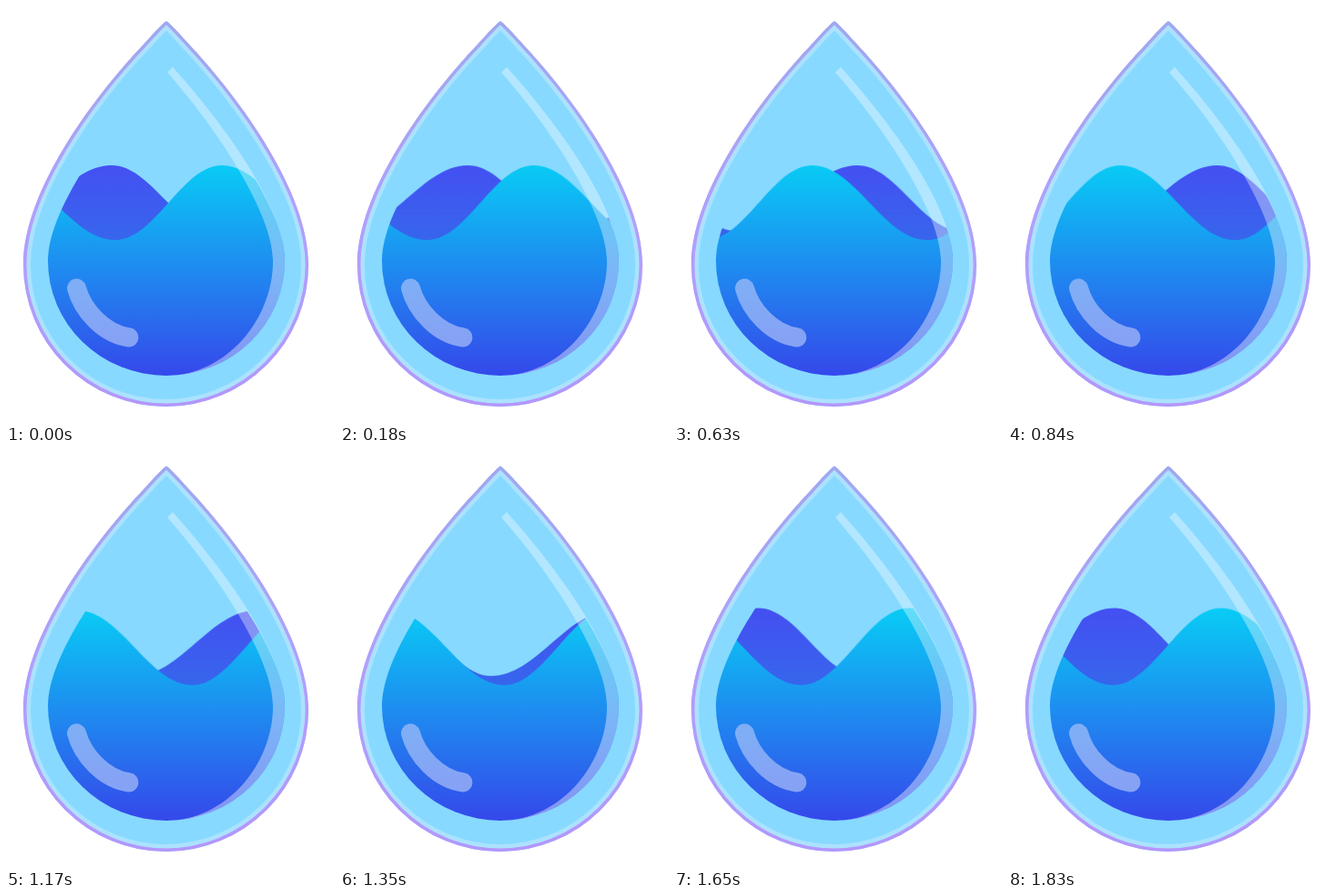
These frames come from a looping animation (360x458 px, 1.86 s). An HTML page:

```html
<!DOCTYPE html>
<html lang="en">
<head>
<meta charset="utf-8">
<title>Water drop</title>
<style>
  html, body { margin: 0; width: 100%; height: 100%; overflow: hidden; background: #fff; }
  svg { display: block; width: 360px; height: 458px; }
  .wave { animation: drift 1860ms steps(62) infinite; }
  #front { --run: -252px; }
  #back { --run: 252px; }
  @keyframes drift { to { transform: translateX(var(--run)); } }
</style>
</head>
<body>
<svg viewBox="0 0 360 458">
  <defs>
    <path id="shell" d="M176 16.5C181 20 190 30 200 41C258 103 332 205 332 284A156.5 156 0 0 1 19 284C19 205 93 103 152 41C162 30 171 20 176 16.5Z"/>
    <clipPath id="shellClip"><use href="#shell"/></clipPath>
    <clipPath id="tankClip">
      <path d="M176 62L180 66C245 140 306 225 306 280A130 126 0 0 1 46 280C46 225 107 140 172 66Z"/>
    </clipPath>
    <linearGradient id="rim" x2="0" y2="1">
      <stop offset="0" stop-color="#a3a6ee"/>
      <stop offset=".5" stop-color="#b49efc"/>
      <stop offset="1" stop-color="#b496fb"/>
    </linearGradient>
    <linearGradient id="water" gradientUnits="userSpaceOnUse" x1="0" y1="175" x2="0" y2="405">
      <stop offset="0" stop-color="#09cbf5"/>
      <stop offset="1" stop-color="#3549eb"/>
    </linearGradient>
    <linearGradient id="deep" gradientUnits="userSpaceOnUse" x1="0" y1="175" x2="0" y2="257">
      <stop offset="0" stop-color="#4450f2"/>
      <stop offset="1" stop-color="#3766ec"/>
    </linearGradient>
    <linearGradient id="shine" gradientUnits="userSpaceOnUse" x1="0" y1="67" x2="0" y2="405">
      <stop offset="0" stop-color="#fff" stop-opacity=".36"/>
      <stop offset=".5" stop-color="#fff" stop-opacity=".36"/>
      <stop offset=".65" stop-color="#d8e4fe" stop-opacity=".5"/>
      <stop offset="1" stop-color="#d0d6fd" stop-opacity=".52"/>
    </linearGradient>
    <linearGradient id="glint" x2="0" y2="1">
      <stop offset="0" stop-color="#7faef6"/>
      <stop offset="1" stop-color="#86a2f5"/>
    </linearGradient>
  </defs>

  <g clip-path="url(#shellClip)">
    <use href="#shell" fill="#87d9ff"/>
    <use href="#shell" fill="none" stroke="#abe2fe" stroke-width="16"/>
    <use href="#shell" fill="none" stroke="url(#rim)" stroke-width="7"/>
  </g>

  <g clip-path="url(#tankClip)">
    <path id="back" class="wave" fill="url(#deep)"/>
    <path id="front" class="wave" fill="url(#water)"/>
  </g>

  <path fill="url(#shine)" d="M183 67C248 140 306 225 306 280A130 126 0 0 1 176 406C241 406 293 345 293 280C293 230 236 140 177 73Z"/>
  <path fill="none" stroke="url(#glint)" stroke-width="21" stroke-linecap="round" d="M77.500 310C84 334 107 360 135 364"/>
</svg>
<script>
  // Joins crests and troughs with near-cosine arcs, then closes below the tank.
  function wave(id, points) {
    let [px, py] = points[0];
    let d = `M${px} 420V${py}`;
    for (const [x, y] of points.slice(1)) {
      const k = (x - px) * 0.375;
      d += `C${px + k} ${py} ${x - k} ${y} ${x} ${y}`;
      [px, py] = [x, y];
    }
    document.getElementById(id).setAttribute("d", d + "V420Z");
  }

  wave("front", [[-130, 257], [-13, 175], [120, 257], [237, 175], [363, 257], [481.5, 172.5], [611, 257]]);
  wave("back", [[-397, 175], [-264, 247], [-131, 172.5], [-17, 247], [116, 175], [230, 247], [364, 175]]);
</script>
</body>
</html>
```
